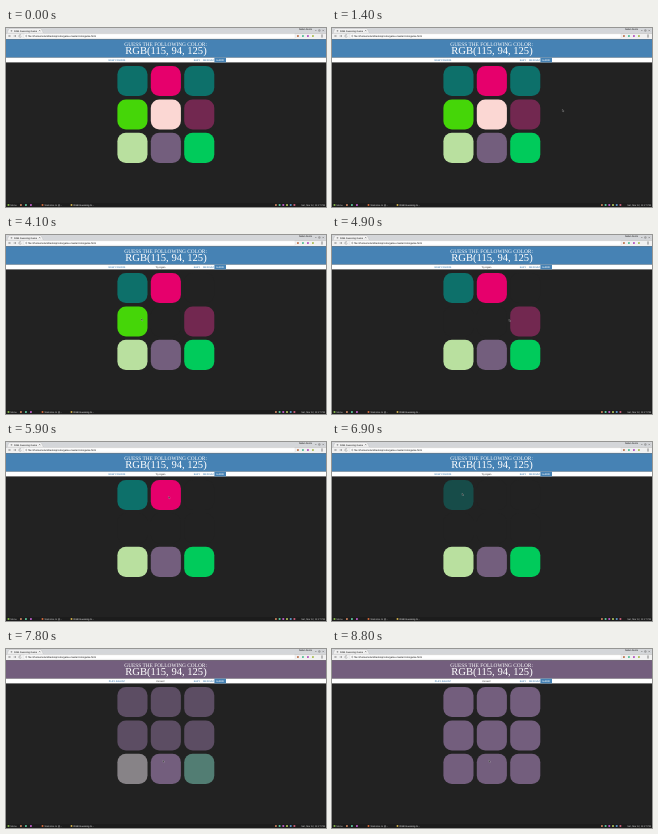
Animation of 320 by 179 pixels, one loop 8.9 s. Source, as an HTML page:

```html
<!DOCTYPE html>
<html lang="en">
<head>
<meta charset="utf-8">
<title>RGB Guessing Game</title>
<style>
html, body { margin: 0; width: 100%; height: 100%; overflow: hidden; background: #222; }
svg { display: block; width: 100vw; height: 100vh; }
text { font-family: "Liberation Sans", Arial, sans-serif; font-size: 2.4px; text-rendering: geometricPrecision; }
.title { font-family: "Liberation Serif", "Times New Roman", serif; fill: #fff; text-anchor: middle; }
.nav { font-family: Lato, sans-serif; font-weight: 700; font-size: 2.3px; letter-spacing: .2px; fill: #4682b4; text-anchor: middle; }
.icon { fill: none; stroke: #666; stroke-width: .45; }
.panel { fill: #ddd; }
</style>
</head>
<body>
<svg viewBox="0 0 320 179" preserveAspectRatio="none">
  <!-- browser window -->
  <rect width="320" height="5.2" fill="#d4d6d9"/>
  <path d="M1 5.2L3 .5H35L37.5 5.2Z" fill="#f2f2f2" stroke="#aaa" stroke-width=".3"/>
  <circle cx="5.5" cy="2.8" r=".9" fill="#999"/>
  <text x="8" y="3.6">RGB Guessing Game</text>
  <path class="icon" d="M33 2l1.3 1.3m0-1.3l-1.3 1.3M309 2.5h1.5M312.7 1.8h1.4v1.4h-1.4zM316.5 1.8l1.4 1.4m0-1.4l-1.4 1.4"/>
  <text x="293" y="2.3">Nolan Ferris</text>
  <rect y="5.2" width="320" height="6.2" fill="#f1f1f1"/>
  <rect x="18" y="5.8" width="271" height="4.5" rx=".6" fill="#fff" stroke="#ccc" stroke-width=".3"/>
  <path class="icon" d="M5 8H2.6l1-1m-1 1l1 1M7.5 8h2.4l-1-1m1 1l-1 1M15 7.2a1.2 1.2 0 1 0 .2 1.2M315 7h2m-2 1h2m-2 1h2"/>
  <circle class="icon" cx="20.3" cy="8" r=".7"/>
  <text x="22.3" y="8.9" style="font-size:2.5px">file:///home/nolan/Desktop/colorgame-master/colorgame.html</text>
  <g id="addons"></g>

  <!-- page -->
  <rect id="head" y="11.4" width="320" height="18.2"/>
  <text class="title" x="159.6" y="18" style="font-size:5.35px">GUESS THE FOLLOWING COLOR:</text>
  <text class="title" x="160" y="26.2" style="font-size:10.6px">RGB(115, 94, 125)</text>
  <rect y="29.6" width="320" height="4.8" fill="#fff"/>
  <rect x="208.4" y="29.6" width="11.6" height="4.8" fill="#4682b4"/>
  <text class="nav" id="reset" x="111" y="33"></text>
  <text id="note" x="154.4" y="33" fill="#222" text-anchor="middle"></text>
  <text class="nav" x="191" y="33">EASY</text>
  <text class="nav" x="202.5" y="33">MEDIUM</text>
  <text class="nav" x="214.3" y="33" style="fill:#fff">HARD</text>
  <g id="board"></g>

  <!-- desktop panel -->
  <rect y="175" width="320" height="4" fill="#1c1c1c"/>
  <circle cx="2.5" cy="177" r="1.1" fill="#86b84b"/>
  <text class="panel" x="4.6" y="177.9">Menu</text>
  <g id="launchers"></g>
  <circle cx="36.5" cy="177" r="1" fill="#d56a3a"/>
  <text class="panel" x="38.5" y="177.9">Welcome to @...</text>
  <circle cx="65.5" cy="177" r="1" fill="#d0b04a"/>
  <text x="67.5" y="177.9" fill="#fff">RGB Guessing G...</text>
  <g id="tray"></g>
  <text class="panel" x="319" y="177.9" text-anchor="end">Sat, Mar 12, 11:27 PM</text>
  <path id="cursor" d="M0 0V2.2L.6 1.7 1 2.6 1.4 2.4 1 1.6H1.6Z" fill="#111" stroke="#fff" stroke-width=".2"/>
</svg>
<script>
const LOOP = 8900, FADE = 300;
const DARK = "#222", BLUE = "#4682b4", ANSWER = "rgb(115, 94, 125)";
const TEAL = "#0d706a", SIZE = 30.1, PITCH = 33.4;
const colors = [TEAL, "#e6006c", TEAL, "#45d608", "#fbd7d3", "#722850", "#b9e09f", ANSWER, "#00cb5b"];

// tile and click time of each guess; the last one is right
const guesses = [[2, 2620], [4, 3640], [3, 4560], [5, 5260], [1, 6060], [0, 6820], [7, 7660]];
const clicks = Object.fromEntries(guesses);
const [firstClick, winTime] = [guesses[0][1], guesses[6][1]];

const $ = id => document.getElementById(id);
const clamp = v => Math.max(0, Math.min(1, v));
const easeOut = (p, power) => 1 - (1 - clamp(p)) ** power;
const lerp = (a, b, p) => a + (b - a) * p;
const blend = (a, b, p) => `color-mix(in srgb, ${b} ${p * 100}%, ${a})`;
const left = i => 111.4 + i % 3 * PITCH;
const top_ = i => 38 + Math.floor(i / 3) * PITCH;

function addRect(parent, x, y, size, rx, fill) {
  const rect = document.createElementNS("http://www.w3.org/2000/svg", "rect");
  Object.entries({ x, y, width: size, height: size, rx, fill })
    .forEach(([key, value]) => rect.setAttribute(key, value));
  return $(parent).appendChild(rect);
}

function addIcons(parent, count, x, y, gap) {
  for (let i = 0; i < count; i++)
    addRect(parent, x + i * gap, y, 1.8, 0.5, `hsl(${i * 137 + 20} 45% 55%)`);
}

const tiles = colors.map((color, i) => addRect("board", left(i), top_(i), SIZE, 8.5, color));
addIcons("addons", 4, 291, 7.1, 5);
addIcons("launchers", 3, 14, 176.1, 5);
addIcons("tray", 6, 269, 176.1, 3.7);

// the pointer enters from below, then stops a little short of each tile's middle
const stops = [{ x: 272, y: 181, t: 700 }, { x: 222, y: 111.5, t: 1050 }, { x: 231, y: 79, t: 1650 }];
for (const [tile, t] of guesses) {
  const last = stops[stops.length - 1];
  stops.push({
    x: lerp(left(tile) + SIZE / 2, last.x, 0.1),
    y: lerp(top_(tile) + SIZE / 2, last.y, 0.1) - 2,
    t
  });
}

function pointerAt(t) {
  const next = stops.findIndex(stop => stop.t > t);
  if (next < 1) return next ? stops[stops.length - 1] : stops[0];
  const a = stops[next - 1], b = stops[next];
  const p = easeOut(((t - a.t) / (b.t - a.t) - 0.2) / 0.65, 3);
  return { x: lerp(a.x, b.x, p), y: lerp(a.y, b.y, p) };
}

function draw(t) {
  const won = t >= winTime;
  const win = easeOut((t - winTime) / FADE, 2);
  tiles.forEach((tile, i) => {
    const gone = colors[i] === ANSWER ? 0 : easeOut((t - (clicks[i] ?? Infinity)) / FADE, 2);
    tile.style.fill = blend(blend(colors[i], DARK, gone), ANSWER, win);
  });
  $("head").style.fill = won ? ANSWER : BLUE;
  $("reset").textContent = won ? "PLAY AGAIN?" : "NEW COLORS";
  $("note").textContent = won ? "Correct!" : t >= firstClick ? "Try Again" : "";
  const { x, y } = pointerAt(t);
  $("cursor").setAttribute("transform", `translate(${x} ${y})`);
}

// motion advances in steps of a tenth of a second
const start = performance.now();
function tick() {
  const t = (performance.now() - start) % LOOP;
  draw(Math.floor(t / 100) * 100);
  requestAnimationFrame(tick);
}
tick();
</script>
</body>
</html>
```
